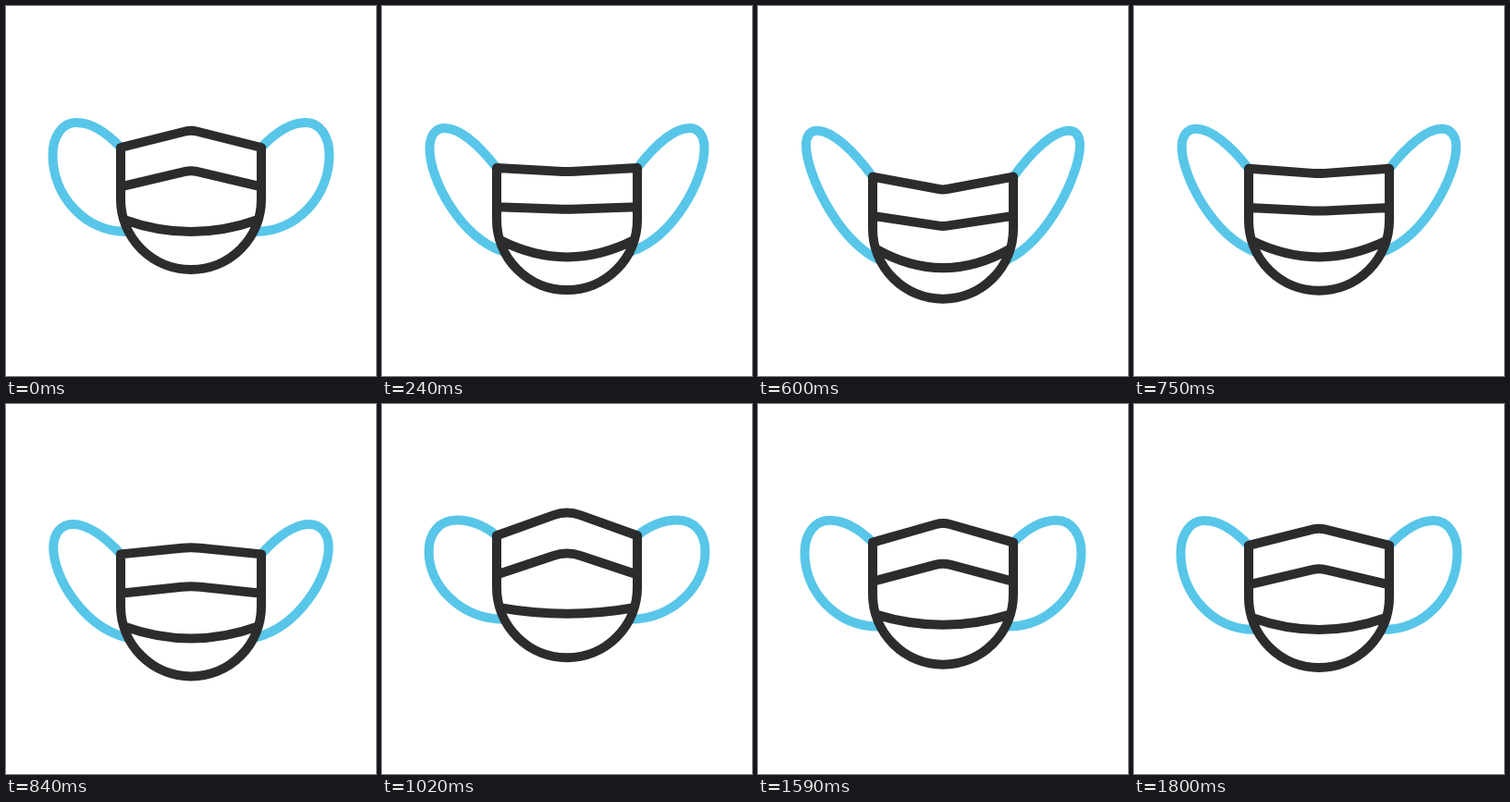
An HTML page for the animation above (1.83 s loop, 400 by 400 pixels).

```html
<!DOCTYPE html>
<html lang="en">
<head>
<meta charset="utf-8">
<title>Face mask</title>
<style>
  html, body { margin: 0; width: 100%; height: 100%; overflow: hidden; background: #fff; }
  svg { display: block; width: 100vw; height: 100vh; }
</style>
</head>
<body>
<svg viewBox="0 0 400 400" fill="none" stroke-width="10" stroke-linecap="round" stroke-linejoin="round">
  <g stroke="#58c6e8">
    <path id="earLeft"/>
    <path id="earRight" transform="matrix(-1 0 0 1 400 0)"/>
  </g>
  <path id="body" stroke="#2c2c2c"/>
</svg>
<script>
const LOOP = 1830, STEP = 30;
const LEFT = 124, RIGHT = 276, MID = 200, RADIUS = 76;

// y: upper corners; top/fold: [apex offset, rounding]; sag: lower seam depth
// ear: points of the strap after its start at the corner
const rest = {
  y: [153], top: [-19, 6], fold: [-17.8, 6], sag: [13],
  ear: [108, 136, 92, 126, 76, 126, 60, 126, 50.5, 142, 50.5, 161, 50.5, 205, 85, 244, 130, 244]
};
const down = {
  y: [186], top: [15.5, 4], fold: [12.5, 4], sag: [21],
  ear: [103, 157, 80, 135, 63, 135, 56, 135, 52, 141, 52, 150, 52, 180, 85, 252, 130, 275.5]
};
const up = {
  y: [139.5], top: [-30, 15], fold: [-28, 16], sag: [5.5],
  ear: [110, 129, 95, 125, 82, 125, 62, 125, 50.5, 140, 50.5, 160, 50.5, 197, 84, 230, 130, 230]
};

const moves = [
  { start: 0, end: 480, from: rest, to: down, ease: [0.5, 0.3] },
  { start: 480, end: 1170, from: down, to: up, ease: [0.65, 0.4] },
  { start: 1170, end: LOOP, from: up, to: rest, ease: [0.5, 0.5] }
];

// Cubic easing with flat ends; x1 and x2 are the handle times
function ease(t, [x1, x2]) {
  let lo = 0, hi = 1;
  for (let i = 0; i < 24; i++) {
    const s = (lo + hi) / 2, r = 1 - s;
    if (3 * r * r * s * x1 + 3 * r * s * s * x2 + s ** 3 < t) lo = s; else hi = s;
  }
  return lo * lo * (3 - 2 * lo);
}

function poseAt(time) {
  const { start, end, from, to, ease: handles } = moves.find(m => time < m.end);
  const p = ease((time - start) / (end - start), handles);
  const pose = {};
  for (const key in from) pose[key] = from[key].map((v, i) => v + (to[key][i] - v) * p);
  return pose;
}

// Line across the mask with a rounded bend in the middle
function bend(y, [apex, round]) {
  const shoulder = y + apex * (1 - round / (MID - LEFT));
  return `M${LEFT} ${y}L${MID - round} ${shoulder}` +
    `Q${MID} ${y + apex} ${MID + round} ${shoulder}L${RIGHT} ${y}`;
}

const [earLeft, earRight, body] = ["earLeft", "earRight", "body"].map(id => document.getElementById(id));

function draw(time) {
  const { y: [y], top, fold, sag: [sag], ear } = poseAt(time);
  const strap = `M${LEFT} ${y}C${ear.join(" ")}`;
  earLeft.setAttribute("d", strap);
  earRight.setAttribute("d", strap);

  const sides = `V${y + 56}A${RADIUS} ${RADIUS} 0 0 1 ${LEFT} ${y + 56}Z`;
  const seam = `M127.5 ${y + 78}Q${MID} ${y + 78 + 2 * sag} 272.5 ${y + 78}`;
  body.setAttribute("d", bend(y, top) + sides + bend(y + 42.3, fold) + seam);
}

let origin;
function tick(now) {
  origin ??= now;
  draw(Math.floor(((now - origin) % LOOP) / STEP) * STEP);
  requestAnimationFrame(tick);
}
draw(0);
requestAnimationFrame(tick);
</script>
</body>
</html>
```
